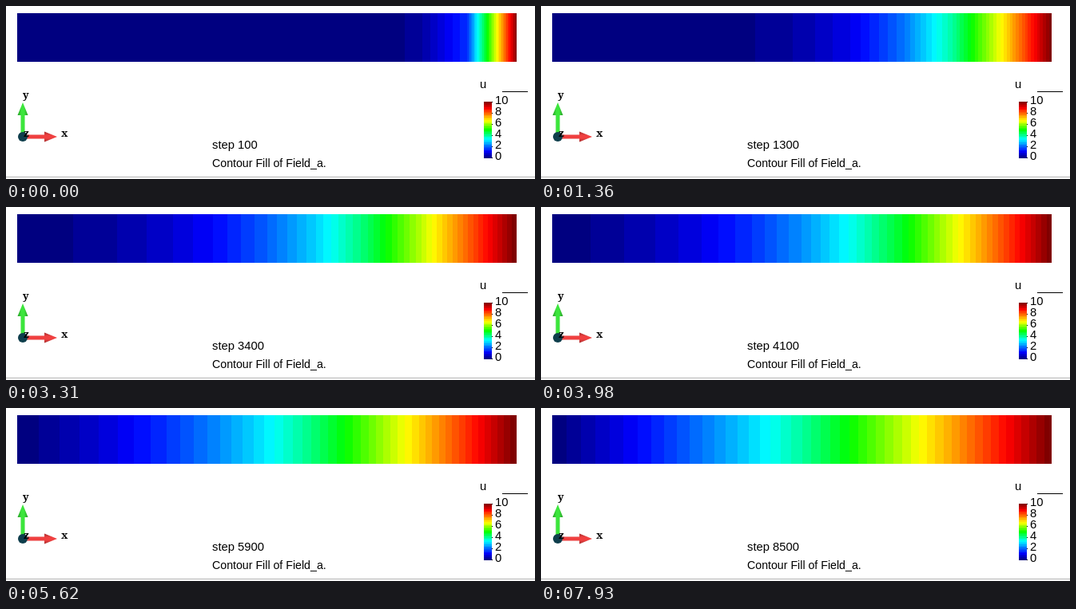
These frames come from a looping animation (662 by 217 pixels, 8000 ms). An HTML page with a canvas:

```html
<!DOCTYPE html>
<html>
<head>
<meta charset="utf-8">
<style>
html, body { margin: 0; width: 100%; height: 100%; overflow: hidden; background: #fff; }
canvas { display: block; }
</style>
</head>
<body>
<canvas id="stage" width="662" height="217"></canvas>
<script>
const ctx = document.getElementById('stage').getContext('2d');
const LOOP = 8000, LAST = 85, BANDS = 50, CELLS = 10, RATE = 0.2248;
const BAR = { x: 14, y: 9, w: 625, h: 61 };

// Pace of the step counter: time in ms, steps in hundreds.
const PACE = [[360, 1], [450, 2], [1360, 13], [2310, 23], [3310, 34],
  [4650, 48], [5620, 59], [7930, LAST]];

const ramp = (t, a, b) => Math.min(1, Math.max(0, (t - a) / (b - a)));

function stepAt(time) {
  let step = PACE[0][1];
  for (let i = 1; i < PACE.length; i++) {
    const [t0, s0] = PACE[i - 1], [t1, s1] = PACE[i];
    step += (s1 - s0) * ramp(time, t0, t1);
  }
  return Math.floor(step + 1e-6);
}

// Dark blue, blue, cyan, green, yellow, red, dark red.
function bandColor(band) {
  const t = band / (BANDS - 1);
  const r = ramp(t, 1 / 2, 2 / 3) - ramp(t, 8 / 9, 1) / 2;
  const g = ramp(t, 1 / 9, 1 / 3) - ramp(t, 2 / 3, 8 / 9);
  const b = 0.5 + ramp(t, 0, 1 / 9) / 2 - ramp(t, 1 / 3, 1 / 2);
  return `rgb(${[r, g, b].map(c => Math.round(255 * Math.max(0, c)))})`;
}
const colors = Array.from({ length: BANDS }, (_, i) => bandColor(i));

// One implicit diffusion step on a rod held at 0 (left) and 10 (right).
function diffuse(u) {
  const c = [0], d = [0], next = u.slice();
  for (let i = 1; i < CELLS; i++) {
    const m = 1 + 2 * RATE - RATE * c[i - 1];
    c[i] = RATE / m;
    d[i] = (u[i] + RATE * d[i - 1]) / m;
  }
  for (let i = CELLS - 1; i > 0; i--) next[i] = d[i] + c[i] * next[i + 1];
  return next;
}

const profiles = [Array(CELLS + 1).fill(0)];
profiles[0][CELLS] = 10;
for (let i = 1; i <= LAST; i++) profiles.push(diffuse(profiles[i - 1]));

function drawBar(u) {
  for (let px = 0; px < BAR.w; px++) {
    const s = px / BAR.w * CELLS;
    const i = Math.floor(s);
    const value = u[i] + (u[i + 1] - u[i]) * (s - i);
    ctx.fillStyle = colors[Math.min(BANDS - 1, Math.floor(value / 10 * BANDS))];
    ctx.fillRect(BAR.x + px, BAR.y, 1, BAR.h);
  }
}

function text(str, x, y, size, style = '', family = '"Liberation Sans", Arial, sans-serif') {
  ctx.font = `${style} ${size}px ${family}`;
  ctx.fillStyle = '#000';
  ctx.fillText(str, x, y);
}

const axisLabel = (str, x, y) => text(str, x, y, 13, 'bold', '"Noto Serif", serif');

function drawLegend() {
  text('u', 593, 103, 14.8);
  ctx.fillRect(621, 107, 32, 1);
  for (let y = 0; y < 71; y++) {
    ctx.fillStyle = colors[Math.floor((70.5 - y) / 71 * BANDS)];
    ctx.fillRect(598, 120 + y, 10, 1);
  }
  for (let v = 0; v <= 10; v += 2) {
    text(String(v), 612, 193 - v * 7, 14.8);
    ctx.fillRect(608, 190 - v * 7, 1, 1);
  }
}

// Arrow along +x from the local origin.
function arrow(angle, light, dark) {
  ctx.save();
  ctx.translate(21, 164);
  ctx.rotate(angle);
  const g = ctx.createLinearGradient(0, -6, 0, 6);
  g.addColorStop(0, dark);
  g.addColorStop(0.35, light);
  g.addColorStop(0.65, light);
  g.addColorStop(1, dark);
  ctx.fillStyle = g;
  ctx.fillRect(4, -2.5, 24, 5);
  ctx.beginPath();
  ctx.moveTo(43, 0);
  ctx.lineTo(27, -6.5);
  ctx.lineTo(27, 6.5);
  ctx.fill();
  ctx.restore();
}

function drawAxes() {
  arrow(-Math.PI / 2, '#3ce63c', '#28a028');
  arrow(0, '#f04040', '#ac3030');
  ctx.fillStyle = '#0e3e4c';
  ctx.beginPath();
  ctx.arc(21, 164, 6, 0, Math.PI * 2);
  ctx.fill();
  axisLabel('y', 21, 116);
  axisLabel('x', 69, 164);
  axisLabel('z', 22, 164);
}

function draw(time) {
  const step = stepAt(time);
  ctx.fillStyle = '#fff';
  ctx.fillRect(0, 0, 662, 217);
  drawBar(profiles[step]);
  drawLegend();
  drawAxes();
  text(`step ${step * 100}`, 258, 179, 14.8);
  text('Contour Fill of Field_a.', 258, 202, 14.2);
  ctx.fillStyle = '#b4b4b4';
  ctx.fillRect(0, 214, 662, 1);
}

const start = performance.now();
function tick() {
  draw((performance.now() - start) % LOOP);
  requestAnimationFrame(tick);
}
tick();
</script>
</body>
</html>
```
